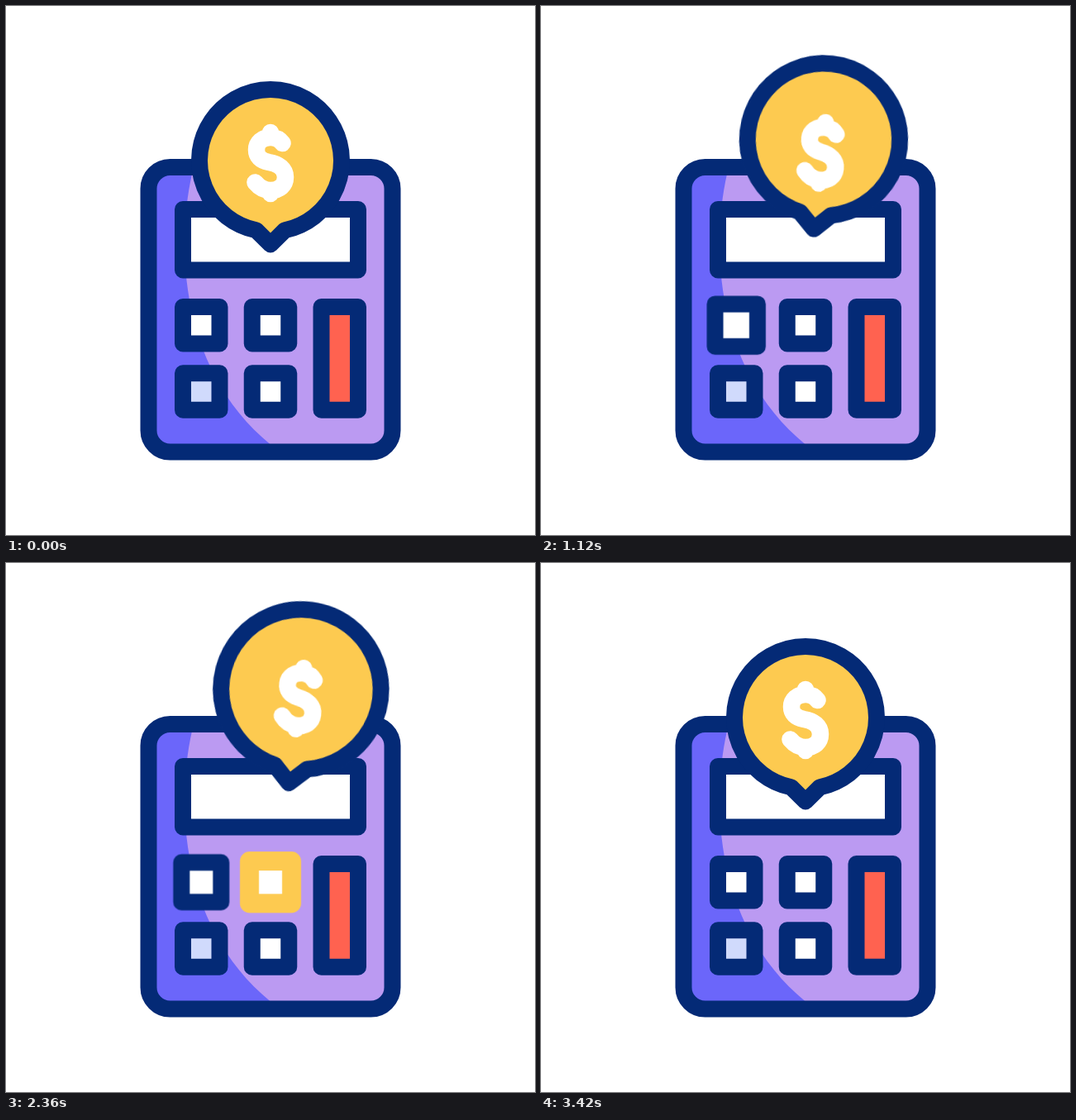
Animation of 640 by 640 pixels, one loop 3600 ms. Source, as an HTML page:

```html
<!DOCTYPE html>
<html lang="en">
<head>
<meta charset="utf-8">
<title>Calculator</title>
<style>
  :root { --navy: #042a76; --gold: #fdca50; }
  html, body { margin: 0; width: 100%; height: 100%; overflow: hidden; background: #fff; }
  svg { display: block; width: 100%; height: 100%; }

  .line { stroke: var(--navy); stroke-width: 20; stroke-linejoin: round; vector-effect: non-scaling-stroke; }
  .key { transform-box: fill-box; transform-origin: center; }
  .key, .body, .bubble, .balloon, .dollar {
    animation-duration: 3.6s;
    animation-iteration-count: infinite;
    animation-timing-function: ease-in-out;
  }

  /* keys: the negative delay places the first press in the loop */
  .key { animation-name: press, flash; animation-timing-function: ease-in-out, step-end; animation-delay: var(--at); }
  .key.top-left { animation-name: press-left, flash-left; }
  .key.tall { animation-name: press-tall, flash-tall; }

  @keyframes press {
    0%, 17.22%, 100% { transform: scale(1); }
    8.61% { transform: scale(1.29); }
  }
  @keyframes press-left {
    0%, 17.22%, 33.08%, 50.3%, 100% { transform: scale(1); }
    8.61%, 41.69% { transform: scale(1.29); }
  }
  @keyframes press-tall {
    0%, 17.22%, 46.44%, 63.66%, 100% { transform: scale(1); }
    8.61%, 55.05% { transform: scale(1.29); }
  }
  @keyframes flash {
    0% { stroke: var(--gold); stroke-width: 23; }
    5.86%, 100% { stroke: var(--navy); stroke-width: 20; }
  }
  @keyframes flash-left {
    0%, 33.08% { stroke: var(--gold); stroke-width: 23; }
    5.86%, 38.94%, 100% { stroke: var(--navy); stroke-width: 20; }
  }
  @keyframes flash-tall {
    0%, 46.44% { stroke: var(--gold); stroke-width: 23; }
    5.86%, 52.3%, 100% { stroke: var(--navy); stroke-width: 20; }
  }

  .body { animation-name: hop; }
  @keyframes hop {
    0%, 78.2%, 95%, 100% { transform: translateY(0); }
    86.8% { transform: translateY(-8px); }
  }

  .bubble { animation-name: sway; }
  @keyframes sway {
    0%, 6.11% { transform: translate(320px, 187px) rotate(0deg); }
    20.56%, 23.33% { transform: translate(244.3px, 160px) rotate(-20deg); }
    36.5%, 37.8% { transform: translate(393px, 162.5px) rotate(20deg); }
    49%, 51.5% { transform: translate(398px, 161.5px) rotate(20.5deg); }
    74% { transform: translate(340px, 149.5px) rotate(2deg); animation-timing-function: ease-in; }
    83.9% { transform: translate(350.5px, 134px) rotate(10.6deg); animation-timing-function: ease-out; }
    87.5% { transform: translate(346px, 122.5px) rotate(8deg); }
    95%, 100% { transform: translate(320px, 187px) rotate(0deg); }
  }

  .balloon { animation-name: swell; }
  @keyframes swell {
    0%, 6.11%, 95%, 100% { transform: scale(1); }
    20.56%, 23.33% { transform: scale(1.19); }
    36.5%, 37.8% { transform: scale(1.01); }
    49%, 51.5% { transform: scale(1.185); }
    74% { transform: scale(1.1); }
    83.9%, 87.5% { transform: scale(1.19); }
  }

  .dollar { animation-name: slide; }
  @keyframes slide {
    0%, 6.11%, 95%, 100% { transform: translateY(3px); }
    20.56%, 23.33% { transform: translateY(5px); }
    36.5%, 37.8% { transform: translateY(22px); }
    49%, 51.5% { transform: translateY(16px); }
    74% { transform: translateY(9px); }
    83.9%, 87.5% { transform: translateY(4.5px); }
  }
</style>
</head>
<body>
<svg viewBox="0 0 640 640">
  <g class="body">
    <rect x="172.5" y="195" width="295" height="344.5" rx="26" fill="#bb9af2"/>
    <path fill="#6b66fa" d="M227 195C204 285 208 450 332 539.5H198.5A26 26 0 0 1 172.5 513.5V221A26 26 0 0 1 198.5 195Z"/>
    <rect class="line" x="172.5" y="195" width="295" height="344.5" rx="26" fill="none"/>
    <rect class="line" x="214" y="246" width="212" height="73.5" fill="#fff"/>

    <rect class="line key top-left" style="--at:-2.938s" x="214" y="364" width="44.5" height="44.5" fill="#fff"/>
    <rect class="line key" style="--at:-1.395s" x="297.75" y="364" width="44.5" height="44.5" fill="#fff"/>
    <rect class="line key" style="--at:-2.117s" x="214" y="444.2" width="44.5" height="44.5" fill="#d0dafc"/>
    <rect class="line key" style="--at:-3.274s" x="297.75" y="444.2" width="44.5" height="44.5" fill="#fff"/>
    <rect class="line key tall" style="--at:-2.457s" x="381.5" y="364" width="44.5" height="124.7" fill="#ff6250"/>
  </g>

  <g class="bubble">
    <path class="line balloon" fill="#fdca50" d="M-17.5 84.2A86 86 0 1 1 17.5 84.2L0 101.5Z"/>
    <path class="dollar" fill="none" stroke="#fff" stroke-width="20.5" stroke-linecap="round" stroke-linejoin="round"
      d="M14.5-24C11-29 6-31 0-31C-10-31-17-25-17-16C-17-8-12-3-2-1C10 1 18 7 18 17C18 27 11 33 0 33C-8 33-14 29-18.5 23.5M0-37V-31M0 33V37"/>
  </g>
</svg>
</body>
</html>
```
